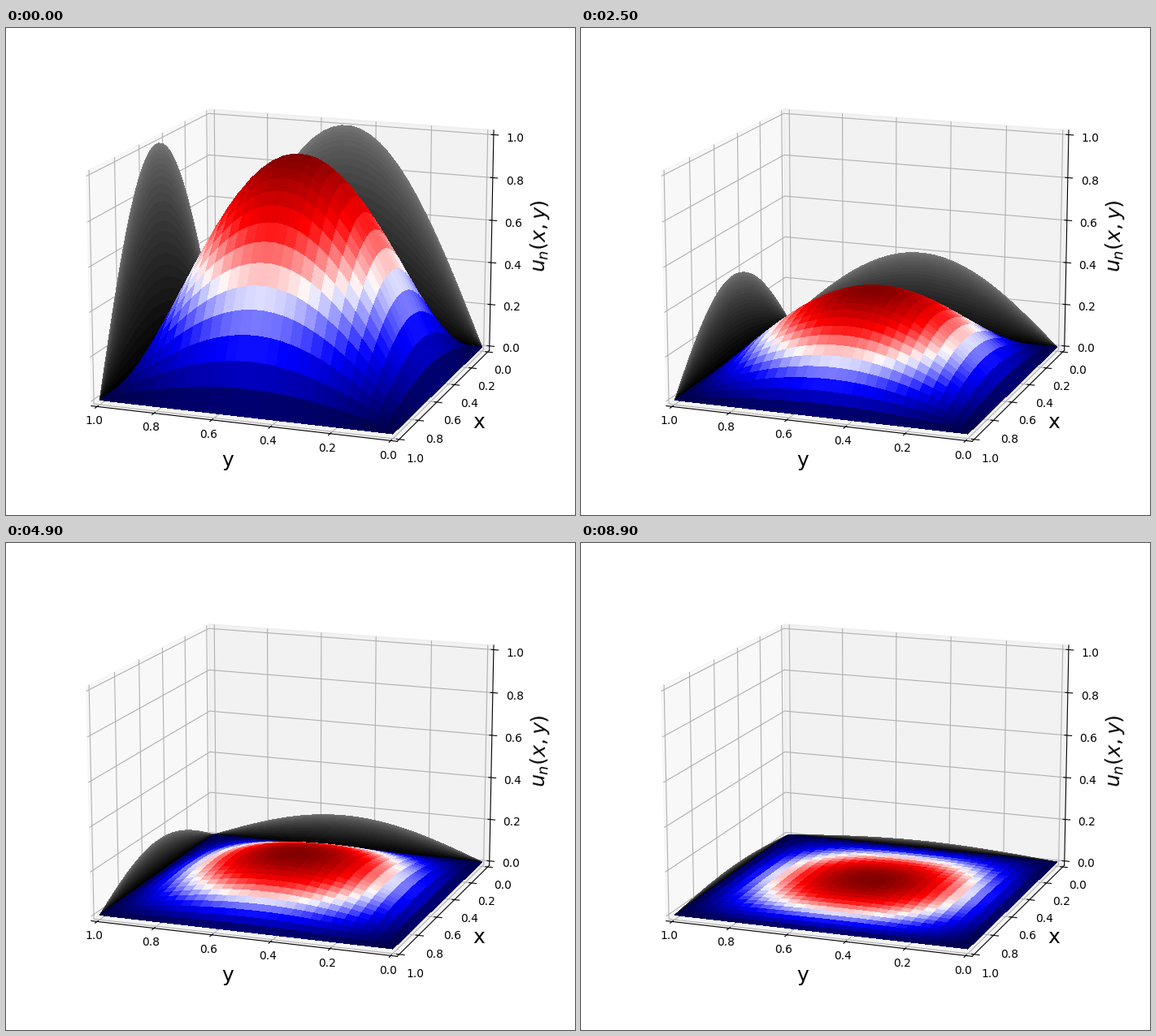
Write a matplotlib script that moves like this. It is 700 by 600 pixels and loops after 9 s.

```python
import numpy as np
import matplotlib.pyplot as plt
from matplotlib.animation import FuncAnimation
from mpl_toolkits.mplot3d.art3d import Poly3DCollection

FRAMES, INTERVAL = 90, 100
DECAY = 0.0376      # heat loss per frame
N = 30              # grid points per side
MARGIN = 1 / 48

plt.rcParams["font.family"] = "DejaVu Sans"
fig = plt.figure(figsize=(7, 6), dpi=100)
ax = fig.add_axes([0, 0, 1, 1], projection="3d", computed_zorder=False)
ax.view_init(elev=15, azim=110)
for set_lim in (ax.set_xlim, ax.set_ylim, ax.set_zlim):
    set_lim(-MARGIN, 1 + MARGIN)
ax.set_xlabel("y", fontsize=18)
ax.set_ylabel("x", fontsize=18)
ax.set_zlabel("$u_n(x,y)$", fontsize=18, labelpad=8)
ax.tick_params(axis="x", pad=-2)
ax.tick_params(axis="z", pad=5)

s = np.linspace(0, 1, N)
X, Y = np.meshgrid(s, s)
U = np.sin(np.pi * X) * np.sin(np.pi * Y)

# Surface cells as quads, coloured by their mean height
P = np.dstack([X, Y, U])
quads = np.stack([P[:-1, :-1], P[:-1, 1:], P[1:, 1:], P[1:, :-1]], axis=2)
quads = quads.reshape(-1, 4, 3)
surface = Poly3DCollection(quads, cmap="seismic", linewidth=0,
                           antialiased=False, zorder=2)
surface.set_array(quads[:, :, 2].mean(axis=1))
ax.add_collection3d(surface)

levels = np.linspace(0, 1, 51)
walls = []


def update(i):
    amp = np.exp(-DECAY * i)
    surface.set_verts(quads * [1, 1, amp])
    while walls:
        walls.pop().remove()
    for zdir, offset in (("x", 1), ("y", 0)):
        walls.append(ax.contourf(X, Y, amp * U, zdir=zdir, offset=offset,
                                 levels=levels, cmap="gray_r", zorder=1))


anim = FuncAnimation(fig, update, frames=FRAMES, interval=INTERVAL,
                     init_func=lambda: None, repeat=True, repeat_delay=0)
plt.show()
```
